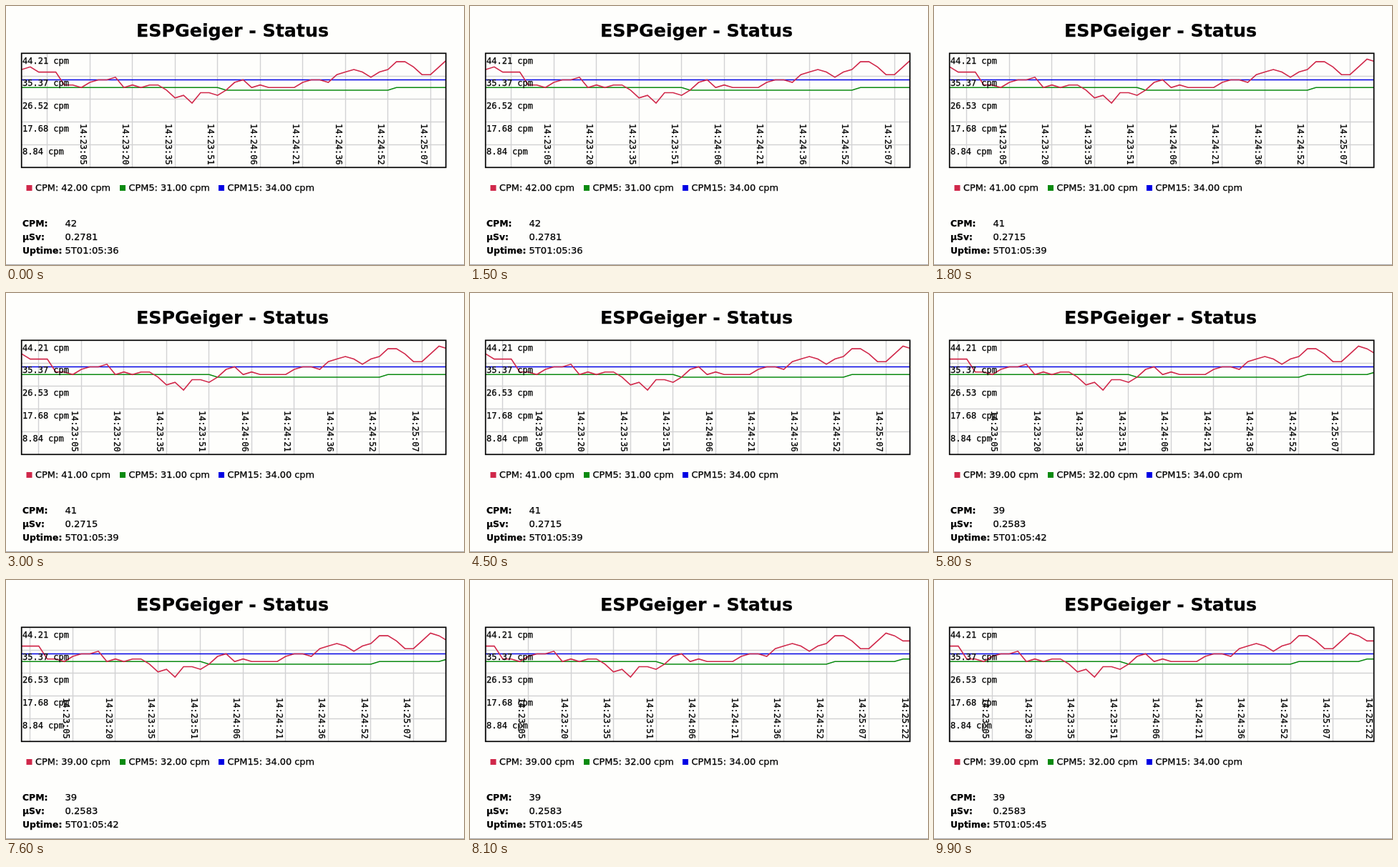
An HTML page with a canvas that plays this animation: 640 by 363 pixels, repeating every 10 s.

```html
<!DOCTYPE html>
<html lang="en">
<head>
<meta charset="utf-8">
<title>ESPGeiger - Status</title>
<style>
html, body { margin: 0; width: 100%; height: 100%; overflow: hidden; background: #fefefc; }
canvas { display: block; width: 640px; height: 363px; }
</style>
</head>
<body>
<canvas id="stage" width="640" height="363"></canvas>
<script>
const ctx = document.getElementById('stage').getContext('2d');
const LOOP = 10000, TICK = 3000, FIRST_TICK = 1700;
const SANS = '"DejaVu Sans", Verdana, sans-serif';
const MONO = '12px "DejaVu Sans Mono", monospace';
const RED = '#d0284a', GREEN = '#0a8a10', BLUE = '#0000e4', GRID = '#d2d2d4';
const BOX = { x: 22, y: 66.5, w: 593, h: 160 };
// The newest point lies just beyond the right edge.
const SPAN = 50, DX = 11.9, MAX = 44.21;

const cpm = [
  38, 39, 37, 37, 37, 32, 32, 31, 33, 34, 34, 35, 31, 32, 31, 32, 32, 30,
  27, 28, 25, 29, 29, 28, 30, 33, 34, 31, 32, 31, 31, 31, 31, 33, 34, 34,
  33, 36, 37, 38, 37, 35, 37, 38, 41, 41, 39, 36, 36, 39, 42, 41, 39, 39
];
const cpm5 = cpm.map((_, i) => i > 51 ? 32 : i > 23 && i < 44 ? 30 : 31);
const cpm15 = cpm.map(() => 34);
const times = ['23:05', '23:20', '23:35', '23:51', '24:06',
  '24:21', '24:36', '24:52', '25:07', '25:22'];
const doses = ['0.2781', '0.2715', '0.2583', '0.2583'];

const xAt = i => BOX.x + i * DX;
const yAt = v => BOX.y + BOX.h * (1 - v / MAX);

// A hairline outline gives the slightly heavy text its weight.
function text(str, x, y, font) {
  ctx.font = font;
  ctx.fillStyle = ctx.strokeStyle = '#000';
  ctx.lineWidth = 0.25;
  ctx.fillText(str, x, y);
  ctx.strokeText(str, x, y);
}

function path(points, color, width) {
  ctx.beginPath();
  points.forEach(([x, y]) => ctx.lineTo(x, y));
  ctx.strokeStyle = color;
  ctx.lineWidth = width;
  ctx.stroke();
}

function grid(step) {
  for (let k = 1; k < 5; k++) {
    const y = BOX.y + k * 32;
    path([[BOX.x, y], [BOX.x + BOX.w, y]], GRID, 1.4);
  }
  for (let i = 3 - step; i <= SPAN; i += 5) {
    const x = Math.floor(xAt(i)) + 0.5;
    path([[x, BOX.y], [x, BOX.y + BOX.h]], GRID, 1.4);
  }
}

function series(data, step, color) {
  const shown = data.slice(step, step + SPAN + 1);
  path(shown.map((v, i) => [xAt(i), yAt(v)]), color, 1.6);
}

function labels(step) {
  const scale = ['44.21', '35.37', step ? '26.53' : '26.52', '17.68', '8.84'];
  scale.forEach((v, k) => text(v + ' cpm', 23, 80.5 + k * 31.8, MONO));
  times.forEach((t, k) => {
    const i = 8 - step + k * 5;
    if (i > SPAN) return;
    ctx.save();
    ctx.translate(xAt(i) - 13.4, 165);
    ctx.rotate(Math.PI / 2);
    text('14:' + t, 0, 0, MONO);
    ctx.restore();
  });
}

function legend(x, color, str) {
  ctx.fillStyle = color;
  ctx.fillRect(x, 251, 8, 8);
  text(str, x + 12.5, 259, '12.9px ' + SANS);
}

function row(name, value, y) {
  text(name, 23, y, 'bold 12.4px ' + SANS);
  text(value, 82.5, y, '13.1px ' + SANS);
}

function draw(step) {
  const now = cpm[SPAN + step];
  ctx.fillStyle = '#fefefc';
  ctx.fillRect(0, 0, 640, 363);
  ctx.fillStyle = '#a8a8a8';
  ctx.fillRect(0, 362, 640, 1);

  ctx.textAlign = 'center';
  text('ESPGeiger - Status', 316.5, 42.5, 'bold 25.3px ' + SANS);
  ctx.textAlign = 'left';

  ctx.save();
  ctx.beginPath();
  ctx.rect(BOX.x, BOX.y, BOX.w, BOX.h);
  ctx.clip();
  grid(step);
  series(cpm15, step, BLUE);
  series(cpm5, step, GREEN);
  series(cpm, step, RED);
  labels(step);
  ctx.restore();
  ctx.strokeStyle = '#000';
  ctx.lineWidth = 1.7;
  ctx.strokeRect(21.7, 66.3, 593, 160);

  legend(28.5, RED, `CPM: ${now}.00 cpm`);
  legend(159, GREEN, `CPM5: ${cpm5[SPAN + step]}.00 cpm`);
  legend(297, BLUE, 'CPM15: 34.00 cpm');

  row('CPM:', String(now), 308.5);
  row('µSv:', doses[step], 327.5);
  row('Uptime:', '5T01:05:' + (36 + step * 3), 347);
}

const start = performance.now();
function frame() {
  const t = (performance.now() - start) % LOOP;
  draw(Math.floor((t + TICK - FIRST_TICK) / TICK));
  requestAnimationFrame(frame);
}
frame();
</script>
</body>
</html>
```
